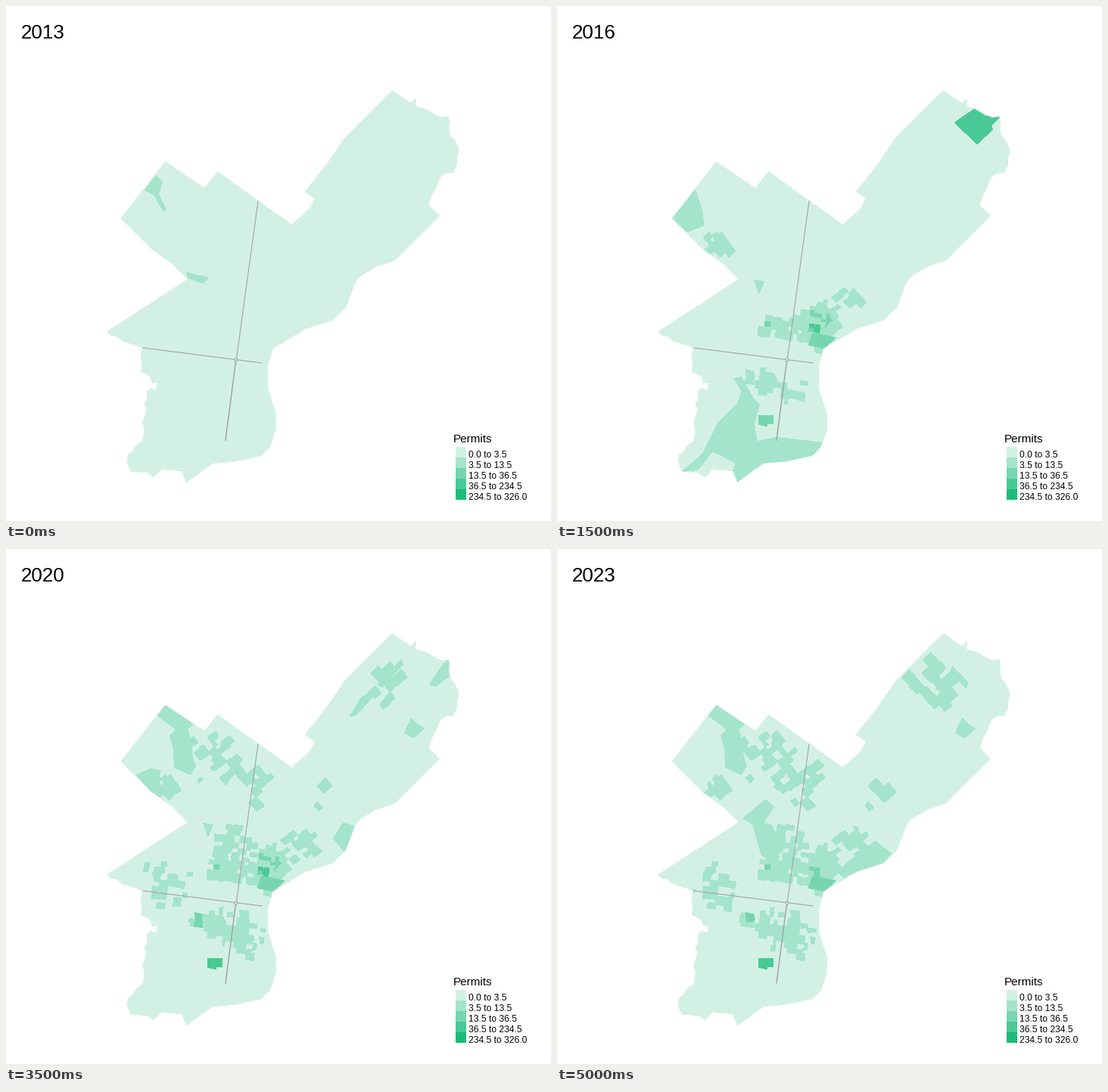
Write a matplotlib script that moves like this. It is 720x681 px and loops after 5500 ms.

```python
import random
import numpy as np
import matplotlib.pyplot as plt
from matplotlib.animation import FuncAnimation
from matplotlib.collections import PolyCollection
from matplotlib.patches import Circle, Polygon, Rectangle

W, H, DPI = 720, 681, 64
YEARS = range(2013, 2024)
PX = 72 / DPI
DARK = np.array([28, 187, 122]) / 255
SHADES = [1 - 0.2 * k * (1 - DARK) for k in range(1, 6)]
LABELS = ["0.0 to 3.5", "3.5 to 13.5", "13.5 to 36.5", "36.5 to 234.5", "234.5 to 326.0"]

rng = random.Random(11)
tracts = []  # (polygon, one class per year)


def points(*xy):
    return np.reshape(xy, (-1, 2)) + 0.5


def rough(pts, step, amp):
    """Break a line into short steps with seeded wobble, for creek banks."""
    out = []
    for a, b in zip(pts[:-1], pts[1:]):
        n = max(1, round(np.hypot(*(b - a)) / step))
        out.append(a)
        for k in range(1, n):
            out.append(a + (b - a) * k / n + [rng.uniform(-amp, amp), rng.uniform(-amp, amp)])
    return np.array(out + [pts[-1]])


# City limits, clockwise from the notch in the north
north = points(395, 245, 423, 210, 446, 176, 480, 141, 510, 112, 535, 129)
creek = points(541, 122, 540, 132, 557, 138, 574, 147, 584, 146, 587, 172, 597, 188, 595, 210,
               590, 220, 576, 222, 562, 249, 557, 263, 572, 277)
river = points(551, 297, 514, 335, 488, 344, 466, 357, 460, 366, 448, 398, 430, 415, 395, 426,
               352, 452, 345, 475, 345, 505, 356, 540, 356, 558, 348, 583, 337, 594, 300, 602,
               272, 604, 238, 629, 232, 614, 205, 612, 195, 622, 186, 616, 165, 615, 160, 603)
cobbs = points(161, 593, 180, 576, 182, 545, 186, 514, 190, 505, 199, 507, 201, 497, 193, 498,
               191, 490, 178, 483, 180, 451, 160, 444, 134, 430)
west = points(240, 361, 222, 342, 190, 319, 152, 280, 210, 206, 262, 241, 279, 219, 377, 289,
              401, 268, 408, 254)
outline = np.vstack([north, rough(creek, 7, 1.5), river, rough(cobbs, 6, 1.8), west])

# Building hot spots: x, y, spread, strength before and after the 2018-2021 upswing
SPOTS = [
    (345, 424, 19, 2.5, 2.4), (280, 424, 11, 1.6, 1.9), (304, 425, 14, 1.3, 1.6),
    (277, 497, 13, 1.7, 2.1), (254, 491, 7, 1.2, 2.2), (308, 510, 27, 0.8, 1.3),
    (298, 390, 27, 0.2, 1.2), (214, 444, 33, 0.5, 1.1), (388, 393, 22, 0.8, 1.2),
    (275, 278, 35, 0.5, 1.1), (324, 308, 30, 0.3, 1.0), (212, 316, 18, 1.1, 0.9),
    (430, 325, 45, 0.3, 0.75), (500, 185, 60, 0.2, 0.75),
]


def heat(x, y, year):
    if year == YEARS[0]:
        return 0
    rise = np.clip((year - 2017.5) / 3, 0, 1)
    h = max((a + (b - a) * rise) * np.exp(-((x - sx) ** 2 + (y - sy) ** 2) / (2 * s * s))
            for sx, sy, s, a, b in SPOTS)
    cool = 1 - 0.25 * max(0, year - 2021)
    return h if h < 1 else 1 + (h - 1) * cool


def split(x, y, w, h, size):
    """Cut a box at random until every part is about one tract in size."""
    if max(w, h) < size * rng.uniform(0.8, 1.6):
        return [(x, y, w, h)]
    t = rng.uniform(0.35, 0.65)
    if w > h:
        return split(x, y, w * t, h, size) + split(x + w * t, y, w * (1 - t), h, size)
    return split(x, y, w, h * t, size) + split(x, y + h * t, w, h * (1 - t), size)


def district(x0, y0, x1, y1, tilt, size):
    """Fill a box with tracts that follow a tilted street grid."""
    mid = np.array([x0 + x1, y0 + y1]) / 2
    r = np.hypot(x1 - x0, y1 - y0) / 2
    c, s = np.cos(np.radians(tilt)), np.sin(np.radians(tilt))
    for x, y, w, h in split(-r, -r, 2 * r, 2 * r, size):
        corners = np.array([(x, y), (x + w, y), (x + w, y + h), (x, y + h)])
        corners += [(rng.uniform(-1, 1), rng.uniform(-1, 1)) for _ in corners]
        poly = corners @ np.array([[c, s], [-s, c]]) + mid
        cx, cy = poly.mean(axis=0)
        if x0 <= cx < x1 and y0 <= cy < y1:
            base = rng.uniform(0.55, 1.45)
            levels = [min(3, int(heat(cx, cy, yr) * base * rng.uniform(0.88, 1.12) + 0.2))
                      for yr in YEARS]
            tracts.append((poly, levels))


def span(level, first, last):
    return {yr: level for yr in range(first, last + 1)}


def area(by_year, *xy):
    """A large tract with its own history."""
    tracts.append((points(*xy), [by_year.get(yr, 0) for yr in YEARS]))


district(140, 365, 360, 545, 7.5, 10)
district(360, 365, 460, 440, -38, 10)
district(150, 205, 345, 365, -38, 11)
district(345, 110, 600, 365, -42, 16)

# Northeast
area({2014: 2, **span(3, 2015, 2017), 2018: 1}, 551, 136, 565, 145, 573, 144, 584, 146, 573, 158,
     575, 163, 554, 182, 540, 168, 525, 154, 533, 148)
area({2014: 1, **span(1, 2019, 2023)}, 535, 223, 541, 230, 552, 237, 538, 249, 526, 243)
area(span(1, 2019, 2020), 522, 146, 524, 152, 497, 182, 491, 180, 494, 172)
area(span(1, 2019, 2020), 486, 185, 489, 188, 472, 208, 461, 220, 454, 221, 468, 197)
area(span(1, 2019, 2020), 584, 147, 588, 165, 567, 181, 559, 179, 577, 152)
area(span(1, 2021, 2022), 488, 135, 496, 129, 509, 133, 493, 156, 474, 147)
area(span(1, 2021, 2022), 446, 176, 454, 168, 466, 188, 464, 197, 444, 205, 434, 194)
area({2023: 1}, 522, 155, 543, 176, 540, 183, 530, 174, 510, 191, 500, 184, 518, 164)

# Delaware riverfront
area({2014: 1, 2023: 1}, 420, 386, 441, 402, 430, 415, 395, 426, 378, 434, 370, 426, 385, 413)
area({2014: 1, 2018: 1}, 399, 387, 414, 377, 421, 386, 403, 395)
area(span(1, 2019, 2021), 445, 362, 460, 366, 449, 402, 432, 382)
area({2021: 1}, 410, 379, 412, 362, 450, 362, 440, 381)
area(span(2, 2014, 2023), 337, 432, 368, 438, 352, 452, 332, 448)
area({2014: 1, 2018: 1}, 334, 472, 346, 472, 346, 511, 334, 510)

# Northwest
area({2013: 1}, 197, 224, 206, 232, 202, 246, 200, 247, 211, 269, 207, 270, 195, 249, 183, 243)
area({2013: 1, 2014: 1, 2018: 2}, 238, 352, 267, 359, 259, 366, 240, 359)
area({2014: 1, 2018: 1}, 191, 268, 193, 285, 183, 294, 174, 299, 167, 293)
area({2015: 1, 2016: 1, 2019: 1}, 182, 243, 192, 272, 193, 290, 172, 298, 152, 280)
area({2019: 3, 2020: 1}, 191, 290, 204, 293, 193, 322, 172, 298)
area(span(1, 2019, 2023), 210, 206, 248, 230, 232, 244, 199, 219)
area({**span(1, 2019, 2020), **span(2, 2021, 2022), 2023: 1}, 216, 246, 229, 234, 240, 240,
     243, 252, 246, 276, 250, 286, 243, 298, 222, 288, 221, 264)
area(span(1, 2021, 2022), 196, 264, 205, 282, 199, 300, 188, 315, 167, 293)
area(span(1, 2021, 2022), 246, 356, 272, 331, 284, 336, 290, 347, 298, 336, 326, 346, 324, 358)
area({2023: 1}, 245, 356, 275, 331, 286, 340, 272, 362, 284, 365, 292, 400, 270, 405, 258, 363)
area({2016: 1, **span(1, 2019, 2020), **span(2, 2021, 2022)}, 260, 362, 273, 364, 266, 380)

# Southwest, the naval basin and the yards between them
area({2014: 1, **span(1, 2016, 2018)}, 233, 492, 243, 490, 258, 517, 267, 526, 260, 551, 264, 580,
     264, 608, 238, 629, 232, 614, 236, 604, 205, 588, 185, 613, 165, 615, 192, 592, 213, 550,
     238, 525, 244, 509)
area({2016: 1}, 264, 575, 290, 570, 351, 577, 337, 594, 300, 602, 260, 611)
area({**span(2, 2014, 2019), **span(3, 2020, 2023)}, 266, 541, 285, 541, 285, 552, 277, 552,
     277, 555, 266, 553)
area({2021: 1}, 174, 574, 179, 563, 192, 556, 186, 570)

fig = plt.figure(figsize=(W / DPI, H / DPI), dpi=DPI, facecolor="white")
ax = fig.add_axes([0, 0, 1, 1])
ax.set_xlim(0, W)
ax.set_ylim(H, 0)
ax.axis("off")


def label(x, y, text, size):
    return ax.text(x, y, text, family="Liberation Sans", fontsize=size * PX, va="baseline")


city = ax.add_patch(Polygon(outline, fc=SHADES[0], lw=0, antialiased=False))
layer = ax.add_collection(PolyCollection([], linewidths=0, antialiaseds=False, zorder=2),
                          autolim=False)
layer.set_clip_path(city)

# Main streets and the square where they meet
grey = "#a3a3a3"
for xs, ys, width in (((333, 304.5), (258, 466), 1.1), ((303.5, 290), (470, 574), 1.5),
                      ((181, 338), (452, 472), 1.1)):
    ax.plot(xs, ys, color=grey, lw=width * PX, zorder=4)
ax.add_patch(Circle((304, 468), 2, fc=SHADES[0], ec=grey, lw=PX, zorder=5))

title = label(20, 43, str(YEARS[0]), 26)
label(591, 577, "Permits", 15.3)
for k, (shade, text) in enumerate(zip(SHADES, LABELS)):
    ax.add_patch(Rectangle((594, 583 + 14 * k), 14, 14, fc=shade, lw=0, antialiased=False))
    label(611, 597 + 14 * k, text, 12)


def draw(i):
    shown = [(poly, SHADES[levels[i]]) for poly, levels in tracts if levels[i]]
    layer.set_verts([poly for poly, _ in shown])
    layer.set_facecolor([shade for _, shade in shown])
    title.set_text(str(YEARS[i]))
    return layer, title


anim = FuncAnimation(fig, draw, frames=len(YEARS), interval=500, repeat=True, repeat_delay=0)
plt.show()
```
